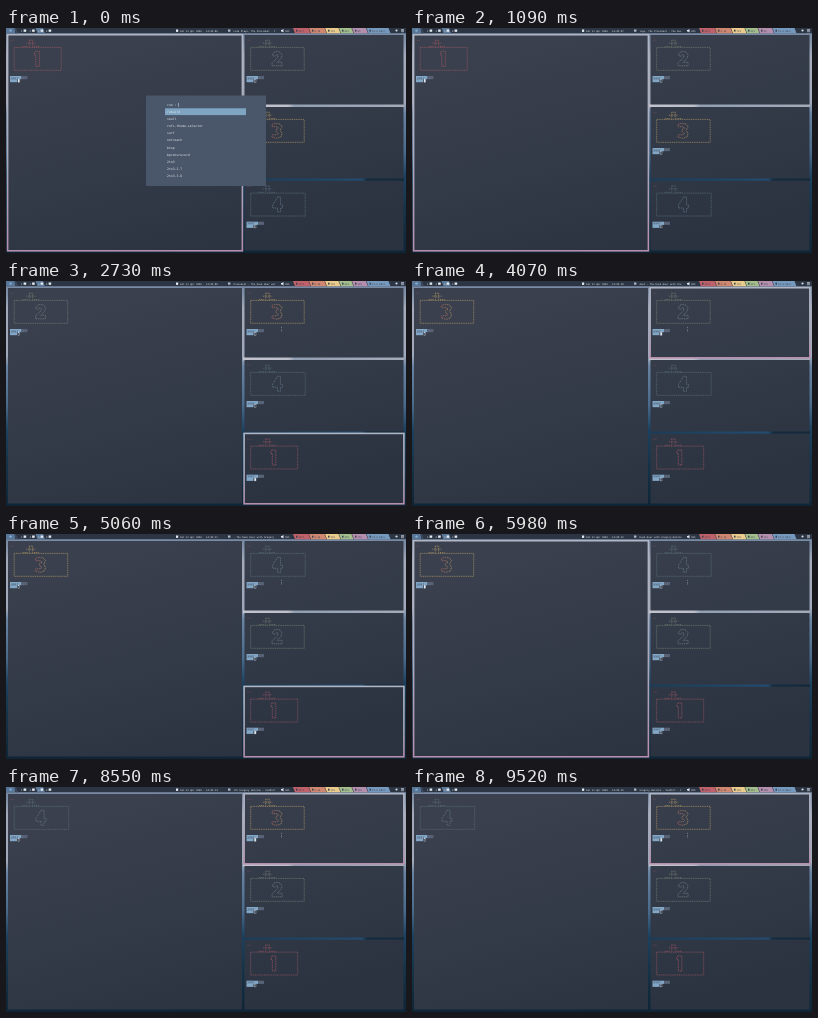
These frames come from a looping animation (400x225 px, 9610 ms). An HTML page:

```html
<!DOCTYPE html>
<html lang="en">
<head>
<meta charset="utf-8">
<title>Tiling desktop</title>
<style>
html, body { margin: 0; width: 100%; height: 100%; overflow: hidden; background: #26384d; }
svg { display: block; width: 100vw; height: 100vh; }
text { font-family: "DejaVu Sans Mono", "Noto Sans Mono", monospace; white-space: pre; text-rendering: geometricPrecision; }
.bar text { font-size: 2.42px; fill: #eceff4; }
.bar .ink { fill: #3b4252; }
.menu text { font-size: 3.15px; fill: #e5e9f0; }
.art { fill: none; stroke-width: .6; }
.art text { font-size: 3px; stroke: none; }
.dash { stroke-dasharray: 1.1 .7; }
</style>
</head>
<body>
<svg viewBox="0 0 400 225" preserveAspectRatio="none">
  <defs>
    <linearGradient id="wall" x2="0" y2="1">
      <stop offset="0" stop-color="#7486a0"/><stop offset=".05" stop-color="#7d8da6"/>
      <stop offset=".12" stop-color="#a3aaba"/><stop offset=".33" stop-color="#a0a9ba"/>
      <stop offset=".38" stop-color="#6883a2"/><stop offset=".55" stop-color="#4a6b8c"/>
      <stop offset=".66" stop-color="#1b4261"/><stop offset=".8" stop-color="#15344a"/>
      <stop offset="1" stop-color="#0e2536"/>
    </linearGradient>
    <linearGradient id="cloud">
      <stop offset="0" stop-color="#c2c3cd"/><stop offset=".28" stop-color="#bdbfca"/>
      <stop offset=".32" stop-color="#929fb2"/><stop offset="1" stop-color="#a3abb9"/>
    </linearGradient>
    <linearGradient id="sea">
      <stop offset="0" stop-color="#1b3c58"/><stop offset=".5" stop-color="#204767"/>
      <stop offset=".74" stop-color="#224c70"/><stop offset=".77" stop-color="#152c3f"/>
      <stop offset="1" stop-color="#142a3b"/>
    </linearGradient>
    <linearGradient id="pane" gradientUnits="userSpaceOnUse" x1="170" y1="0" x2="230" y2="225">
      <stop offset="0" stop-color="#3a404d"/><stop offset=".5" stop-color="#333a48"/>
      <stop offset="1" stop-color="#2b3341"/>
    </linearGradient>
    <linearGradient id="edge" x2="0" y2="1">
      <stop offset="0" stop-color="#b1b6c4"/><stop offset=".6" stop-color="#aaa9bb"/>
      <stop offset="1" stop-color="#b78fae"/>
    </linearGradient>
    <linearGradient id="ember">
      <stop offset="0" stop-color="#c46b62"/><stop offset="1" stop-color="#d3ad6b"/>
    </linearGradient>
  </defs>
  <rect width="400" height="225" fill="url(#wall)"/>
  <rect x="237" y="76" width="161" height="3.5" fill="url(#cloud)"/>
  <rect x="237" y="150" width="161" height="3.5" fill="url(#sea)"/>
  <g id="panes"></g>
  <rect id="focus" fill="none" stroke="url(#edge)" stroke-width="1.6"/>
  <g id="arts"></g>
  <path id="beam" d="M275 46.4h1M275.5 48.2v.8M275 50h1" fill="none" stroke="#a3abb8" stroke-width=".6"/>
  <g id="bar" class="bar"></g>
  <g id="menu" class="menu"></g>
</svg>
<script>
const LOOP = 9610;
const $ = id => document.getElementById(id);

function add(parent, tag, attrs, label) {
  const el = document.createElementNS("http://www.w3.org/2000/svg", tag);
  for (const key in attrs) el.setAttribute(key, attrs[key]);
  if (label !== undefined) el.textContent = label;
  parent.append(el);
  return el;
}
const box = (parent, x, y, width, height, fill) => add(parent, "rect", { x, y, width, height, fill });
const write = (parent, x, y, label, cls = "") => add(parent, "text", { x, y, class: cls }, label);

// Tiling slots: master on the left, stack on the right
const slots = [[2, 7, 234, 215.5], [238.5, 7, 159, 69.5], [238.5, 79, 159, 71.5], [238.5, 152.7, 159, 69.8]];
for (const slot of slots) box($("panes"), ...slot, "url(#pane)");

const terms = [
  { width: 47, box: "#ab5b67", ink: "#c05f6a", digit: "M3 0H7V15H3.5V3.5H2V1.5z" },
  { width: 53.5, box: "#7d8a78", ink: "#82928f", digit: "M0 4L2 .8L5 0L8 .8L10 3.5L9 7L5 11H10V14.5H0V11.5L5.5 6.5L6 4L4 3.4L3 5z" },
  { width: 53.5, box: "#c2a368", ink: "url(#ember)", digit: "M0 1L4 0L8 .8L10 3.5L8 7L10 10L9 13.5L5 15L0 14V11.5H5L6.5 10L4 8.5V6.2L6.5 5L5 3.4H0z" },
  { width: 54.5, box: "#617785", ink: "#6f8799", digit: "M5 0H8V8H10V11H8V15H5V11H0V8z" }
];

function makeTerm({ width, box: line, ink, digit }) {
  const g = add($("arts"), "g", { class: "art" });
  add(g, "text", { x: 2.6, y: 6.4, fill: "#bf616a" }, "~~");
  add(g, "path", {
    d: "M21 5.2h4M18.3 8.2h9.4M21.3 5.3v7.5M24.7 5.3v7.5M14.5 11.6h5.5M26 11.6h5.5",
    class: "dash", stroke: line
  });
  add(g, "path", { d: `M6.2 12.4h${width}v22.9h${-width}z`, class: "dash", stroke: line });
  add(g, "path", {
    d: digit, class: "dash", stroke: ink,
    transform: `translate(${width / 2 + .8} 16.3)`
  });
  box(g, 2, 41, 11.5, 3.2, "#82a6c5");
  box(g, 13.5, 41, 6, 3.2, "#566175");
  box(g, 2, 44.2, 7, 3, "#82a6c5");
  add(g, "text", { x: 3, y: 43.6, fill: "#34445a" }, "user");
  add(g, "text", { x: 14.5, y: 43.5, fill: "#909caf" }, "~");
  const cursor = add(g, "rect", { x: 10, y: 44.4, width: 1.5, height: 2.8, stroke: "#d8dee9", "stroke-width": .35 });
  return { g, cursor };
}
const views = terms.map(makeTerm);

// Start time, terminal in each slot, focused slot
const layouts = [
  [0, "1234", 0], [1260, "2134", 1], [1590, "2314", 2], [1930, "2341", 3],
  [2870, "2341", 0], [3690, "3241", 1], [4390, "3421", 2],
  [5060, "3421", 3], [5400, "3421", 0], [6250, "4321", 1]
];

function showLayout(t) {
  const [, order, active] = layouts.findLast(l => l[0] <= t);
  [...order].forEach((n, i) => {
    const { g, cursor } = views[n - 1];
    g.setAttribute("transform", `translate(${slots[i][0]} ${slots[i][1]})`);
    cursor.setAttribute("fill", i === active ? "#e5e9f0" : "none");
  });
  const [x, y, w, h] = slots[active];
  const frame = { x: x - .4, y: y - .3, width: w + .8, height: h + .6 };
  for (const key in frame) $("focus").setAttribute(key, frame[key]);
  $("beam").setAttribute("visibility", t >= 1260 ? "visible" : "hidden");
}

// Status bar
const bar = $("bar");
const slant = (x, w, fill) => add(bar, "path", { d: `M${x} 0H${x + w}L${x + w + 2} 5.2H${x + 2}z`, fill });
box(bar, 0, 0, 400, 5.2, "#2c3543");
box(bar, 0, 0, 9, 5.2, "#587698");
slant(8, 2, "#3b4a5e");
add(bar, "circle", { cx: 4.5, cy: 2.6, r: 1.2, fill: "#88b0d0" });
slant(29.5, 7.5, "#5b7898");
[15, 23.5, 32, 40].forEach((x, i) => {
  write(bar, x, 3.6, i + 1);
  box(bar, x + 2.6, 1.5, 2.6, 2.3, "#e5e9f0");
});
box(bar, 170, 1.5, 2.2, 2.4, "#e5e9f0");
const clock = write(bar, 174, 3.6, "");
box(bar, 222, 1.5, 2.4, 2.2, "#aeb8c6");
const title = write(bar, 227.5, 3.6, "");
add(bar, "path", { d: "M275 2h1l1.5-1v3.4L276 3.4h-1z", fill: "#e5e9f0" });
write(bar, 279, 3.6, "30%");
const segments = [
  [287, 15.5, "#bf616a", "38°C"], [303, 15.5, "#d08770", "2.1G"], [319, 13.5, "#ebcb8b", "72%"],
  [333, 12.5, "#a3be8c", "41%"], [346, 14, "#b48ead", "12%"], [360.5, 22, "#7598bd", "12.4 kB/s"]
];
const labels = segments.map(([x, w, fill, label]) => {
  slant(x, w, fill);
  box(bar, x + 3, 1.7, 1.5, 1.9, "#3b4252");
  return write(bar, x + 5.5, 3.6, label, "ink");
});
add(bar, "circle", { cx: 390.5, cy: 2.5, r: 1.1, fill: "#d8dee9" });
add(bar, "path", { d: "M395 1.5h3M395 2.6h3M395 3.7h3", stroke: "#d8dee9", "stroke-width": .6 });

const headline = "Late Plays, The President - The Dusk Hour with Gregory Halston - VidPort - Copper Browser";
const scroll = [[0, 0], [1090, 6], [2730, 16], [4070, 21], [5980, 32], [7290, 38], [9520, 47], [LOOP, 47]];

function showBar(t) {
  const k = scroll.findLastIndex(p => p[0] <= t);
  const [t0, i0] = scroll[k], [t1, i1] = scroll[k + 1];
  const start = Math.floor(i0 + (i1 - i0) * (t - t0) / (t1 - t0));
  title.textContent = headline.slice(start, start + 29);
  const seconds = Math.floor(6.1 + t / 1000);
  clock.textContent = "Sat 11 Apr 2020 - 14:05:" + String(seconds).padStart(2, "0");
  labels[4].textContent = 9 + Math.floor((t + 430) / 2000) * 3 % 7 + "%";
}

// Launcher
const menu = $("menu");
box(menu, 140, 67.5, 120, 90.5, "#4a576a");
box(menu, 159, 80.3, 81, 6.8, "#7fa5c2");
write(menu, 161, 78, "run :");
box(menu, 172, 75, .5, 3.8, "#e5e9f0");
["rebuild", "skull", "rofi-theme-selector", "surf", "netreach", "btop", "bpconvrecord", "2to3", "2to3-2.7", "2to3-3.6"]
  .forEach((name, i) => write(menu, 161, 84.9 + i * 7.13, name));

function showMenu(t) {
  menu.style.opacity = Math.min(1, Math.max(0, (540 - t) / 490));
}

function tick(now) {
  const t = now % LOOP;
  showLayout(t);
  showBar(t);
  showMenu(t);
  requestAnimationFrame(tick);
}
tick(performance.now());
</script>
</body>
</html>
```
